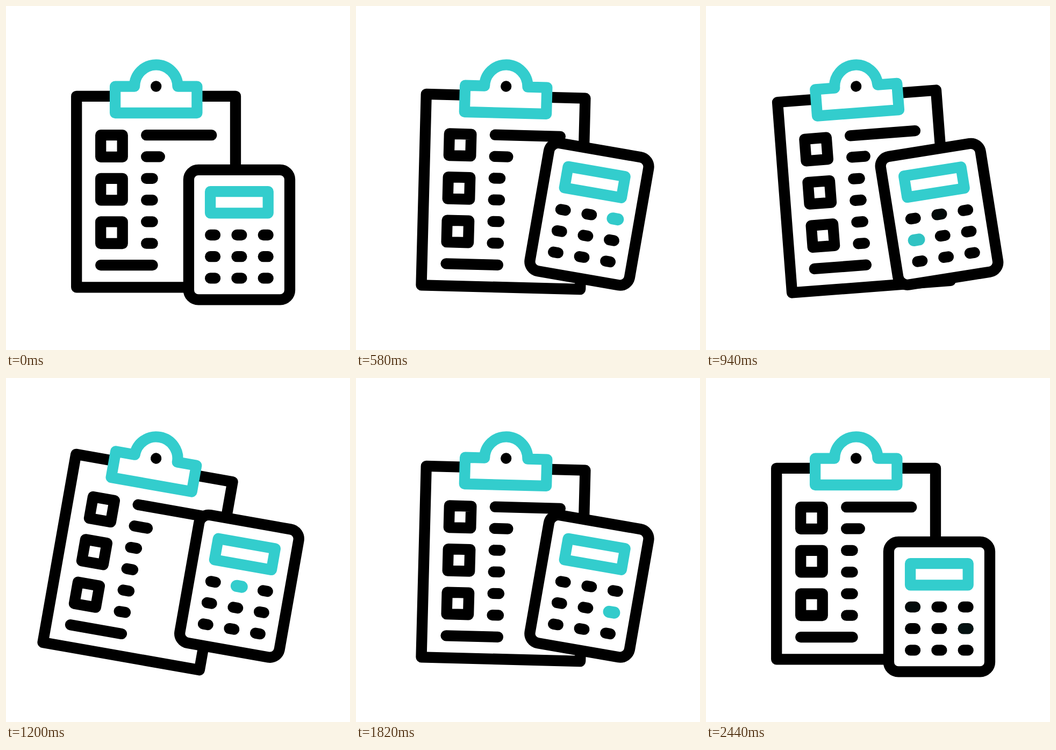
An HTML page that plays this animation: 640x640 px, repeating every 2620 ms.

```html
<!DOCTYPE html>
<html lang="en">
<head>
<meta charset="utf-8">
<title>Clipboard and calculator</title>
<style>
  html, body { margin: 0; height: 100%; overflow: hidden; background: #fff; }
  svg { display: block; width: 100vw; height: 100vh; }
  g { fill: none; stroke: #000; stroke-width: 20.3; stroke-linecap: round; stroke-linejoin: round; }
  .paper { fill: #fff; }
  .accent { stroke: #33cdcd; }
</style>
</head>
<body>
<svg viewBox="0 0 640 640">
  <g id="board">
    <rect class="paper" x="131.2" y="167.8" width="295.8" height="355.5"/>
    <path d="M176.2 240.2h40.5v40.6h-40.5z m0 80.6h40.5v40.6h-40.5z m0 80.6h40.5v40.6h-40.5z"/>
    <path d="M261.2 240.2H382.3M261.2 280.4H285.8M261.2 320.8h11.4m-11.4 40.3h11.4m-11.4 40.3h11.4m-11.4 40.3h11.4M176.2 482.1H272.6"/>
    <path class="paper accent" d="M203.1 149.6H239.1A40.2 40.2 0 0 1 319.5 149.6H355.4V199H203.1Z"/>
    <path d="M279.2 149.5h0"/>
  </g>
  <g id="calc">
    <rect class="paper" x="339.9" y="304.8" width="188.1" height="241.6" rx="18"/>
    <rect class="accent" x="380.1" y="345.2" width="107.6" height="40.1"/>
  </g>
</svg>
<script>
const LOOP = 2620, LAST = 2440, STEP = 20;
const TEAL = [51, 205, 205];
const board = document.getElementById("board");
const calc = document.getElementById("calc");

// Eased value from [time, value] pairs.
function track(t, points) {
  if (t <= points[0][0]) return points[0][1];
  for (let i = 1; i < points.length; i++) {
    const [t0, a] = points[i - 1], [t1, b] = points[i];
    if (t < t1) {
      const u = (t - t0) / (t1 - t0);
      return a + (b - a) * u * u * (3 - 2 * u);
    }
  }
  return points[points.length - 1][1];
}

const swing = [[0, 0], [400, 10], [800, -10], [1200, 10], [1600, -10], [2000, 10], [2400, 0]];
const lift = [[0, 0], [300, -38.3], [2100, -38.3], [2400, 0]];
const tilt = [[300, 0], [600, 10], [900, -10], [1200, 10], [1500, -10], [1800, 10], [2100, 0]];

const press = (peak, rest = 0) => [[peak - 300, 0], [peak, 1], [peak + 300, rest]];
const presses = [
  [...press(300), [2400, 0], [2700, 1]],
  press(1200), press(600), press(900), press(1500), press(1800, 0.09)
];

const keys = Array.from({ length: 9 }, (_, i) => {
  const el = document.createElementNS("http://www.w3.org/2000/svg", "path");
  el.setAttribute("d", "M-4.4 0h8.8");
  calc.append(el);
  return { el, x: 384.6 + 49.3 * (i % 3), y: 426 + 40.2 * Math.floor(i / 3), glow: presses[i] || [[0, 0]] };
});

function draw(t) {
  board.setAttribute("transform", `rotate(${track(t, swing)} 279.2 149.5)`);
  calc.setAttribute("transform", `translate(0 ${track(t, lift)}) rotate(${track(t, tilt)} 434 425.6)`);
  for (const { el, x, y, glow } of keys) {
    const k = track(t, glow);
    el.style.stroke = `rgb(${TEAL.map(c => Math.round(c * k))})`;
    el.setAttribute("transform", `translate(${x} ${y}) scale(${1 + 0.1 * k})`);
  }
}

const start = performance.now();
function frame() {
  const t = (performance.now() - start) % LOOP;
  draw(Math.min(Math.floor(t / STEP) * STEP, LAST));
  requestAnimationFrame(frame);
}
frame();
</script>
</body>
</html>
```
